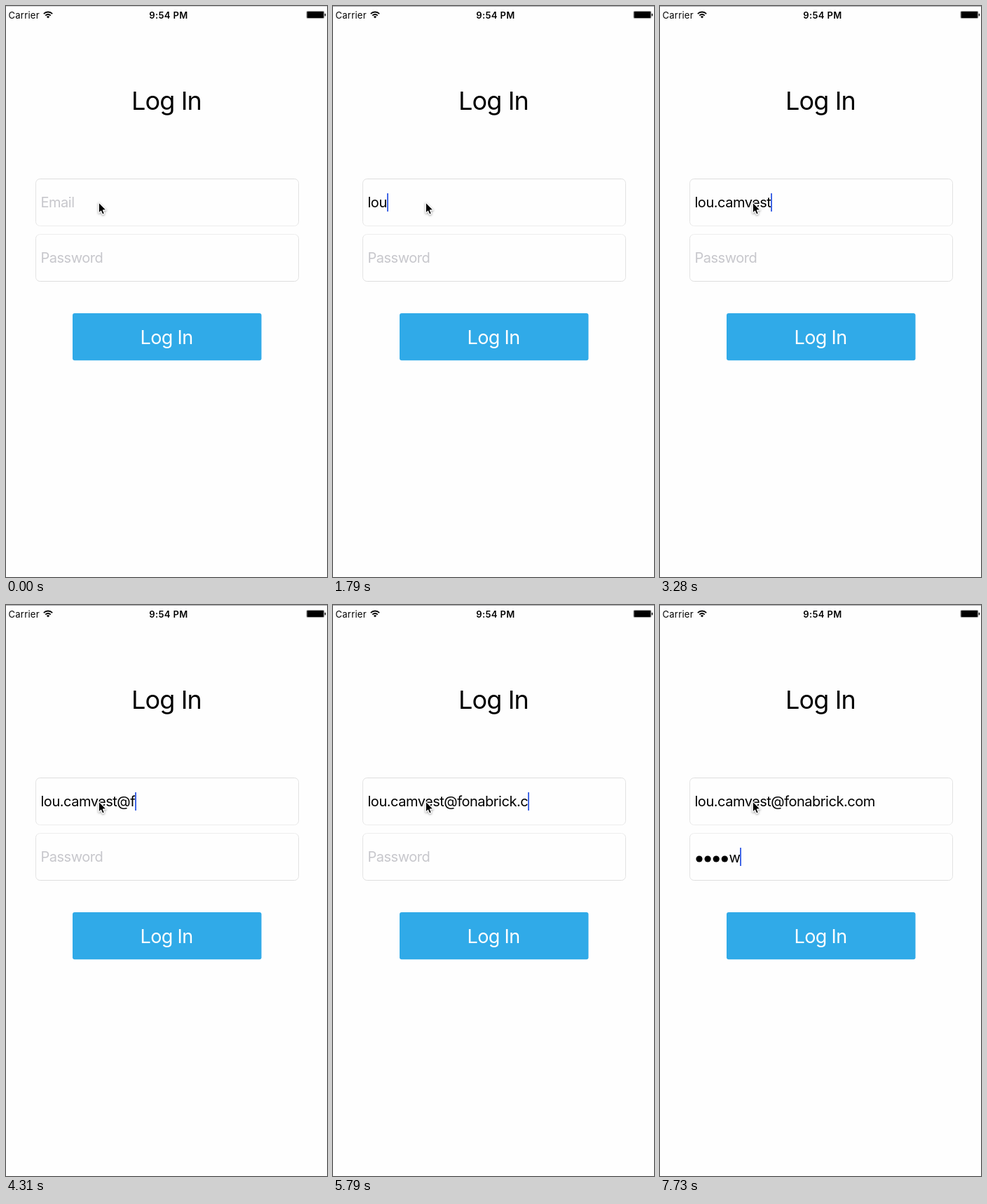
An HTML page with a canvas that plays this animation: 458x814 px, repeating every 8000 ms.

```html
<!DOCTYPE html>
<html lang="en">
<head>
<meta charset="utf-8">
<title>Log In</title>
<style>
  html, body { margin: 0; width: 100%; height: 100%; overflow: hidden; background: #fefefe; }
  canvas { display: block; width: 458px; height: 814px; }
</style>
</head>
<body>
<canvas id="stage" width="458" height="814"></canvas>
<script>
const ctx = document.getElementById('stage').getContext('2d');
const LOOP = 8000;
const LEFT = 49.5;
const EMAIL = 'lou.camvest@fonabrick.com';
const PASSWORD = 'passw';
const PLACEHOLDER = '#c7c7cc';
const CARET = '#4267e6';

// [time, characters typed so far]
const EMAIL_KEYS = [
  [1500, 1], [1650, 2], [1790, 3], [1940, 4], [2090, 5], [2240, 7], [2390, 8],
  [2990, 9], [3140, 10], [3280, 11], [3730, 12], [4310, 13], [4460, 15],
  [4760, 16], [4910, 18], [5050, 20], [5340, 21], [5640, 22], [5790, 23], [5940, 25]
];
const PASSWORD_KEYS = [[6980, 2], [7280, 3], [7430, 4], [7730, 5]];

const typedAt = (keys, t) => keys.reduce((n, [at, count]) => t >= at ? count : n, 0);

function setFont(size, weight, tracking) {
  ctx.font = `${weight} ${size}px Inter, sans-serif`;
  ctx.letterSpacing = `${size * tracking}px`;
}

function label(text, x, y, size, { color = '#000', weight = 400, align = 'left', tracking = -0.024 } = {}) {
  setFont(size, weight, tracking);
  ctx.textAlign = align;
  ctx.fillStyle = color;
  ctx.fillText(text, x, y);
  return ctx.measureText(text).width;
}

function roundRect(x, y, w, h, r) {
  ctx.beginPath();
  ctx.roundRect(x, y, w, h, r);
}

function caret(x, y, alpha = 1) {
  ctx.globalAlpha = alpha;
  ctx.fillStyle = CARET;
  ctx.fillRect(Math.max(50, Math.round(x)), y, 2, 26);
  ctx.globalAlpha = 1;
}

function statusBar(t) {
  ctx.fillStyle = t < 450 ? '#d0d0d2' : '#a6a6a8';
  ctx.fillRect(0, 0, 458, 1);
  label('Carrier', 3.5, 17.5, 13, { tracking: 0.02 });
  label('9:54 PM', 232, 17.5, 13, { weight: 600, align: 'center', tracking: 0.03 });

  // Wi-Fi
  ctx.strokeStyle = ctx.fillStyle = '#000';
  ctx.lineWidth = 1.8;
  for (const r of [5.2, 8.7]) {
    ctx.beginPath();
    ctx.arc(60, 17.2, r, -Math.PI * 0.75, -Math.PI * 0.25);
    ctx.stroke();
  }
  ctx.beginPath();
  ctx.moveTo(60, 17.4);
  ctx.arc(60, 17.4, 3, -Math.PI * 0.75, -Math.PI * 0.25);
  ctx.fill();

  // Battery
  ctx.strokeStyle = '#777';
  ctx.lineWidth = 0.7;
  roundRect(428.9, 7.4, 25, 10.2, 1.5);
  ctx.stroke();
  roundRect(429.5, 8, 23.8, 9, 0.8);
  ctx.fill();
  roundRect(454.7, 10.8, 1.4, 3.6, 0.7);
  ctx.fill();
}

function field(y, topColor, bottomColor) {
  const edge = ctx.createLinearGradient(0, y, 0, y + 67);
  edge.addColorStop(0, topColor);
  edge.addColorStop(0.05, '#e3e3e3');
  edge.addColorStop(0.95, '#e3e3e3');
  edge.addColorStop(1, bottomColor);
  ctx.strokeStyle = edge;
  ctx.lineWidth = 1;
  roundRect(42.5, y, 375, 67, 6);
  ctx.stroke();
}

function emailText(t) {
  const n = typedAt(EMAIL_KEYS, t);
  const typed = EMAIL.slice(0, n);
  if (!n) label('Email', LEFT, 287, 20, { color: PLACEHOLDER });
  const width = n ? label(typed, LEFT, 287, 20) : 0;
  if (t >= 750 && t < 6230) {
    caret(LEFT + width, 267, t >= 1350 && t < 1500 ? 0.3 : 1);
  }
}

function passwordText(t) {
  const n = typedAt(PASSWORD_KEYS, t);
  let x = LEFT;
  if (!n) {
    label('Password', LEFT, 366, 20, { color: PLACEHOLDER });
  } else {
    ctx.fillStyle = '#000';
    for (let i = 0; i < n - 1; i++) {
      ctx.beginPath();
      ctx.arc(56 + i * 12.1, 362, 4.6, 0, Math.PI * 2);
      ctx.fill();
    }
    x = 50.2 + (n - 1) * 12.1;
    x += label(PASSWORD[n - 1], x, 367, 20);
  }
  if (t >= 6230) caret(x - 0.5, 346, t >= 6830 && t < 6980 ? 0.18 : 1);
}

function pointer() {
  const outline = [[0, 0], [0, 14.2], [3.1, 11.3], [5.3, 16.2], [7.7, 15.2], [5.6, 10.3], [10, 10.1]];
  ctx.save();
  ctx.translate(132.5, 280.6);
  ctx.beginPath();
  outline.forEach(([x, y]) => ctx.lineTo(x, y));
  ctx.closePath();
  ctx.lineJoin = 'round';
  ctx.lineWidth = 2;
  ctx.strokeStyle = '#fff';
  ctx.shadowColor = 'rgba(0,0,0,0.4)';
  ctx.shadowBlur = 3;
  ctx.shadowOffsetY = 1;
  ctx.stroke();
  ctx.shadowColor = 'transparent';
  ctx.fillStyle = '#000';
  ctx.fill();
  ctx.lineWidth = 0.8;
  ctx.stroke();
  ctx.restore();
}

function draw(t) {
  ctx.fillStyle = '#fefefe';
  ctx.fillRect(0, 0, 458, 814);
  statusBar(t);
  label('Log In', 229, 148, 36, { align: 'center' });
  field(246.5, '#dedede', '#ededed');
  field(325.5, '#ededed', '#dedede');
  ctx.fillStyle = '#30aae8';
  roundRect(95, 438, 269.5, 67.3, 3);
  ctx.fill();
  label('Log In', 229, 481.5, 27, { color: '#fff', align: 'center' });
  emailText(t);
  passwordText(t);
  pointer();
}

const start = performance.now();
function tick() {
  draw((performance.now() - start) % LOOP);
  requestAnimationFrame(tick);
}
tick();
</script>
</body>
</html>
```
